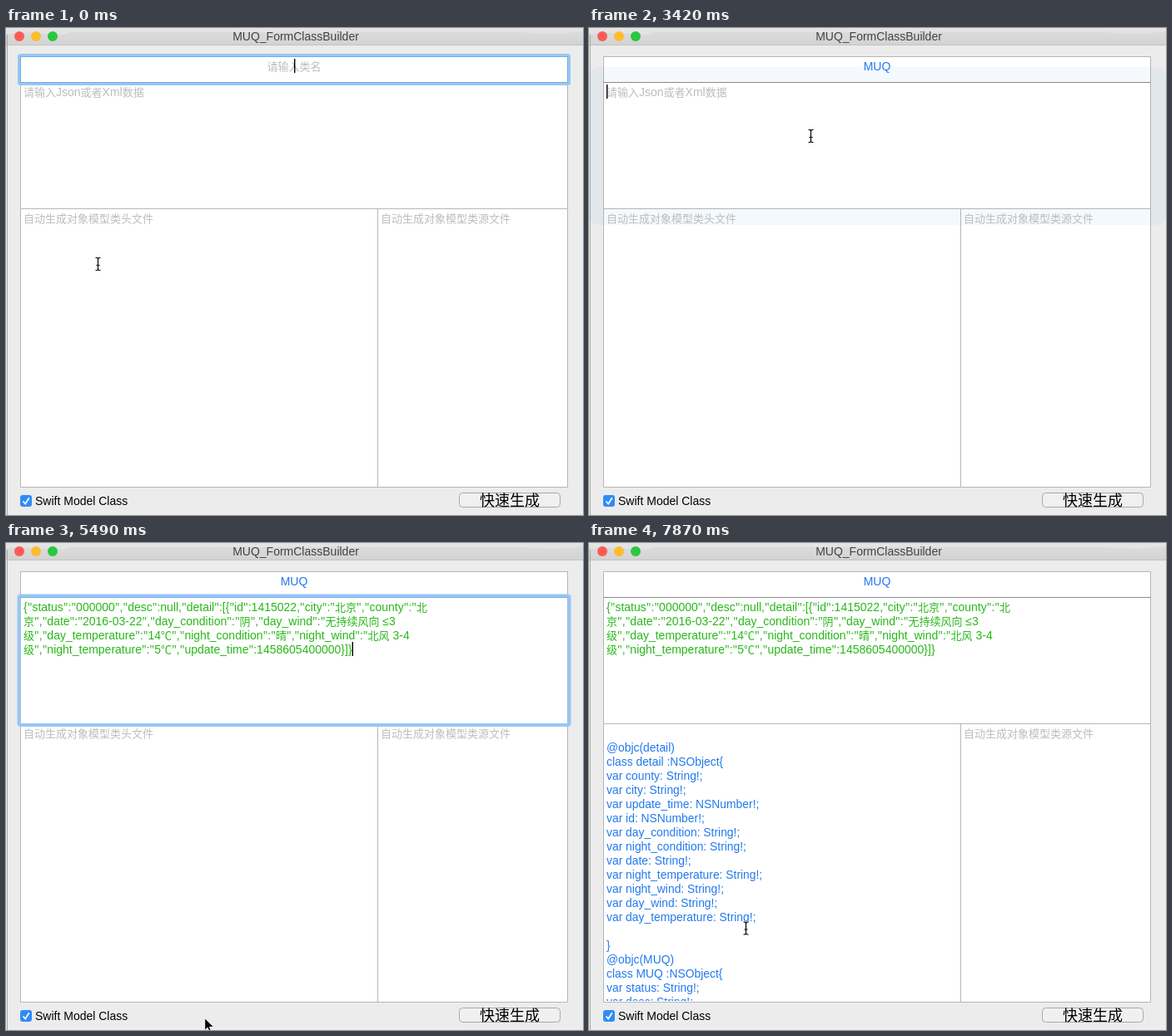
These frames come from a looping animation (693x586 px, 8 s). An HTML page:

```html
<!DOCTYPE html>
<html lang="zh">
<head>
<meta charset="utf-8">
<title>MUQ_FormClassBuilder</title>
<style>
  html, body { margin: 0; width: 100%; height: 100%; overflow: hidden; background: #ececec; }
  svg { display: block; width: 693px; height: 586px; }
  text { font: 14px "Liberation Sans", Arial, "Noto Sans CJK SC", "Noto Sans CJK", sans-serif; white-space: pre; }
  .han { font-size: 13px; font-family: "Noto Sans CJK SC", "Noto Sans CJK", sans-serif; }
  .quote { font-family: "Noto Sans", sans-serif; }
  .mid { text-anchor: middle; }
  .hint { fill: #bdbdbd; }
  .blue { fill: #2179ee; }
  .green { fill: #27b818; }
  #code text { font-size: 13.86px; }
  .button { font-size: 18px; font-family: "Noto Sans CJK SC", "Noto Sans CJK", sans-serif; }
  .pane { fill: #fff; stroke: #b6b6b6; }
  .ring { fill: none; stroke: #98c6f6; stroke-width: 3; }
  .ring .edge { stroke: #78abe0; stroke-width: 1; }
</style>
</head>
<body>
<svg viewBox="0 0 693 586">
  <defs>
    <linearGradient id="bar" x2="0" y2="1">
      <stop stop-color="#dedede"/><stop offset="1" stop-color="#d3d3d3"/>
    </linearGradient>
    <clipPath id="codeClip"><path d="M18 218H446V551H18z"/></clipPath>
    <path id="beamShape" d="M-3-7.5h2l1 1 1-1h2M0-6.5v13M-3 7.5h2l1-1 1 1h2M-2 1.5h4"/>
  </defs>

  <path fill="#ececec" d="M0 0h693v586H0z"/>
  <path fill="url(#bar)" d="M0 0h693v20H0z"/>
  <path fill="#ebebeb" d="M0 0H693V4L660 7 620 5H76L68 8 18 5 0 7z" opacity=".55"/>
  <path stroke="#c2c2c2" d="M0 20.5H693"/>
  <path stroke="#aaa" d="M1.5 8V586"/>
  <circle cx="16" cy="10" r="6" fill="#fc5b55"/>
  <circle cx="36" cy="10" r="6" fill="#fdbc2f"/>
  <circle cx="56" cy="10" r="6" fill="#28c83f"/>
  <text class="mid" x="348" y="15" fill="#434343">MUQ_FormClassBuilder</text>

  <path class="pane" d="M17.5 34.5h657v31h-657z"/>
  <path class="pane" d="M17.5 217.5h429v335h-429zM446.5 217.5h228v335h-228z"/>
  <path class="pane" d="M17.5 65.5h657v152h-657z"/>
  <path stroke="#8d8d8d" d="M17 65.5H675"/>

  <g id="nameRing" class="ring">
    <rect x="15.5" y="32.5" width="661" height="35" rx="2"/>
    <rect class="edge" x="17.5" y="34.5" width="657" height="31"/>
  </g>
  <g id="dataRing" class="ring">
    <rect x="15.5" y="63.5" width="661" height="155.5" rx="2" stroke-width="4" style="stroke-width:4"/>
    <path class="edge" d="M17 65.5H675"/>
  </g>
  <path id="ringGhost" fill="#4a98ec" fill-opacity=".06" fill-rule="evenodd"
    d="M14 47H679Q693 47 693 61V223Q693 237 679 237H14Q0 237 0 223V61Q0 47 14 47zM17 66V217H675V66z"/>

  <text id="nameHint" class="hint mid" x="346" y="51">请输入类名</text>
  <text id="name" class="blue mid" x="346" y="51"></text>
  <text id="dataHint" class="hint" x="21" y="82">请输入Json或者Xml数据</text>
  <g id="data" class="green"></g>
  <text id="codeHint" class="hint" x="21" y="234">自动生成对象模型类头文件</text>
  <text class="hint" x="450" y="234">自动生成对象模型类源文件</text>
  <g id="code" class="blue" clip-path="url(#codeClip)"></g>
  <rect id="caret" width="1.4" height="17"/>

  <rect x="17" y="562" width="14" height="14" rx="3" fill="#2f8cf8"/>
  <path d="M20.5 569.5l2.7 3 4.6-7.2" fill="none" stroke="#fff" stroke-width="1.7"/>
  <text x="35" y="574">Swift Model Class</text>
  <rect x="544.5" y="559.5" width="121" height="17" rx="4" fill="#f0f0f0" stroke="#a9a9a9"/>
  <text class="button mid" x="605" y="575">快速生成</text>

  <g id="beam" fill="none">
    <use href="#beamShape" stroke="#fff" stroke-width="2.6" stroke-opacity=".8"/>
    <use href="#beamShape" stroke="#000" stroke-width="1.2"/>
  </g>
  <path id="arrow" d="M0 0V15l3.4-3.3 2.4 5.5 2.4-1-2.4-5.4H11z" stroke="#fff"/>
</svg>

<script>
const LOOP = 8000;
const TICK = 148.5;   // the picture advances in whole ticks
const $ = id => document.getElementById(id);

const json = [
  '{"status":"000000","desc":null,"detail":[{"id":1415022,"city":"北京","county":"北',
  '京","date":"2016-03-22","day_condition":"阴","day_wind":"无持续风向 ≤3',
  '级","day_temperature":"14℃","night_condition":"晴","night_wind":"北风 3-4',
  '级","night_temperature":"5℃","update_time":1458605400000}]}'
];
const field = (name, type = 'String') => `var ${name}: ${type}!;`;
const swift = [
  '@objc(detail)', 'class detail :NSObject{',
  field('county'), field('city'), field('update_time', 'NSNumber'), field('id', 'NSNumber'),
  ...['day_condition', 'night_condition', 'date', 'night_temperature',
    'night_wind', 'day_wind', 'day_temperature'].map(name => field(name)),
  '', '}', '@objc(MUQ)', 'class MUQ :NSObject{', field('status'), field('desc')
];

// Chinese runs are set slightly smaller than the Latin text around them.
const styled = text => text.replace(/"|[\u4e00-\u9fff℃]+/g, run =>
  `<tspan class="${run === '"' ? 'quote' : 'han'}">${run}</tspan>`);
const lines = (rows, y) => rows.map((row, i) =>
  `<text x="21" y="${y + i * 17}">${styled(row)}</text>`).join('');

$('data').innerHTML = lines(json, 82);
$('code').innerHTML = lines(swift, 251);
document.querySelectorAll('.hint').forEach(el => { el.innerHTML = styled(el.textContent); });

// Moments of the story, in ticks.
const typed = [11, 12, 15];
const focus = 23, paste = 29, generate = 47, blur = 53;
const edits = [-1, ...typed, focus, paste];

const start = { x: 110.5, y: 284 };
const moves = [
  { from: 0, to: 3, x: 309.5, y: 79 },
  { from: 18, to: 22, x: 266.5, y: 130 },
  { from: 31, to: 36, x: 90, y: 570 },
  { from: 36, to: 43, x: 650.5, y: 576 },
  { from: 43, to: 47, x: 632.5, y: 566.5 },
  { from: 48, to: 53, x: 188.5, y: 463.5 }
];

function pointerAt(tick) {
  return moves.reduce((pos, { from, to, x, y }) => {
    const p = Math.min(1, Math.max(0, (tick - from) / (to - from)));
    const eased = 1 - (1 - p) ** 2;
    return { x: pos.x + (x - pos.x) * eased, y: pos.y + (y - pos.y) * eased };
  }, start);
}

// The caret stands after the latest input and restarts its blink there.
function caretAt(tick) {
  const on = (tick - edits.findLast(edit => edit <= tick)) % 7 < 4;
  if (tick < focus) return { on, x: 346 + $('name').getComputedTextLength() / 2, y: 37 };
  if (tick < paste) return { on, x: 21, y: 68 };
  const last = $('data').lastElementChild;
  return { on: on && tick < blur, x: 21 + last.getComputedTextLength(), y: 119 };
}

const show = (id, on) => $(id).setAttribute('visibility', on ? 'visible' : 'hidden');
const place = (id, { x, y }) => $(id).setAttribute('transform', `translate(${x} ${y})`);

function draw() {
  const tick = Math.floor((performance.now() % LOOP + 5) / TICK);
  const name = 'MUQ'.slice(0, typed.filter(key => key <= tick).length);

  $('name').textContent = name;
  show('nameHint', !name);
  show('nameRing', tick < focus);
  show('ringGhost', tick === focus);
  show('dataRing', tick > focus && tick < blur);
  show('dataHint', tick < paste);
  show('data', tick >= paste);
  show('codeHint', tick < generate);
  show('code', tick >= generate);

  const caret = caretAt(tick);
  show('caret', caret.on);
  place('caret', caret);

  const pointer = pointerAt(tick);
  const overText = pointer.x > 17 && pointer.x < 675 && pointer.y > 34 && pointer.y < 553;
  show('beam', overText);
  show('arrow', !overText);
  place(overText ? 'beam' : 'arrow', pointer);
  requestAnimationFrame(draw);
}
draw();
</script>
</body>
</html>
```
